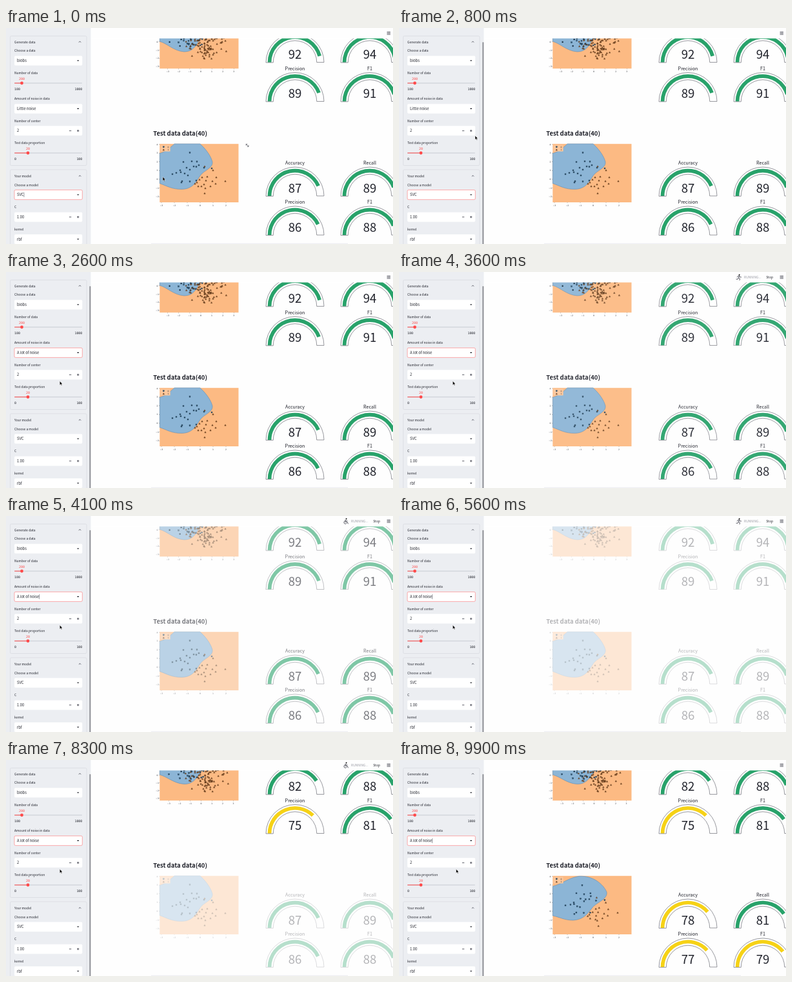
Write an HTML page that moves like this. It is 600x337 px and loops after 10 s.

```html
<!DOCTYPE html>
<html lang="en">
<head>
<meta charset="utf-8">
<title>Classifier playground</title>
<style>
html, body { margin: 0; width: 100%; height: 100%; overflow: hidden; background: #fefefe; }
svg { display: block; width: 600px; height: 337px; }
text { font-family: "Noto Sans CJK JP", "Noto Sans CJK SC", "Open Sans", sans-serif; fill: #20222b; }
.label { font-size: 4.98px; }
.field { font-size: 5.72px; }
.mono { font-family: "DejaVu Sans Mono", "Noto Sans Mono", monospace; font-size: 4.95px; }
.red { fill: #ff4b4b; }
.mid { text-anchor: middle; }
.end { text-anchor: end; }
.title { font-size: 9.5px; font-weight: 600; }
.name { font-size: 7.15px; text-anchor: middle; }
.num { font-size: 18.6px; text-anchor: middle; }
.tick { font-family: "DejaVu Sans", sans-serif; font-size: 3.1px; text-anchor: middle; }
.line { fill: none; stroke: #31333f; stroke-linecap: round; stroke-linejoin: round; }
</style>
</head>
<body>
<svg id="stage" viewBox="0 0 600 337" xmlns="http://www.w3.org/2000/svg"></svg>
<script>
const LOOP = 10000, STEP = 100;
const GREEN = '#28a26a', YELLOW = '#f6d216', ORANGE = '#fcba83', BLUE = '#8cb5d6', PAGE = '#fefefe';

const text = (x, y, s, cls) => `<text x="${x}" y="${y}" class="${cls}">${s}</text>`;
const rect = (x, y, w, h, fill, more = '') =>
  `<rect x="${x}" y="${y}" width="${w}" height="${h}" fill="${fill}" ${more}/>`;
const line = (d, w, more = '') => `<path d="${d}" class="line" stroke-width="${w}" ${more}/>`;
const group = (id, s) => `<g id="${id}">${s}</g>`;

function seeded(seed) {
  return () => {
    seed = (seed * 1664525 + 1013904223) % 4294967296;
    return seed / 4294967296;
  };
}

// Sidebar
const box = (y, h = 15) => rect(13, y, 105.3, h, '#fff', 'rx="1.8"');
const down = y => `<path d="M110 ${y - .8}h3.4l-1.7 1.8z" fill="#20222b"/>`;
const field = (y, s, id = '') =>
  box(y) + `<text ${id && `id="${id}"`} x="17" y="${y + 9.5}" class="field">${s}</text>`;
const select = (y, s, id) => field(y, s, id) + down(y + 7.5);
const stepper = (y, s) => field(y, s) +
  line(`M98.3 ${y + 7.5}h2.6M110.4 ${y + 7.5}h2.6M111.7 ${y + 6.2}v2.6`, .8);
const header = (y, s) => text(13, y, s, 'label') + line(`M113.2 ${y - 1.5}l1.3-1.3 1.3 1.3`, .8);

function slider(y, x, val, min, max) {
  return rect(13, y - .45, 105, .9, '#c8cbd3', 'rx=".4"') + rect(13, y - .45, x - 13, .9, '#ff4b4b', 'rx=".4"') +
    `<circle cx="${x}" cy="${y}" r="2.4" fill="#ff4b4b"/>` +
    text(x, y - 4.7, val, 'mono red mid') + text(13, y + 10.9, min, 'mono') +
    text(118.3, y + 10.9, max, 'mono end');
}

function sidebar() {
  const card = (y, h) => rect(6.5, y, 118.5, h, 'none', 'rx="1.8" stroke="#d3d6dc" stroke-width=".6"');
  const labels = [[37, 'Choose a data'], [72, 'Number of data'], [112, 'Amount of noise in data'],
    [147, 'Number of center'], [181.3, 'Test data proportion'], [246.8, 'Choose a model'],
    [281, 'C'], [315.8, 'kernel']];
  return rect(0, 0, 131.5, 337, '#eceef2') + card(12.5, 202) + card(221, 130) +
    header(23.6, 'Generate data') + header(232.8, 'Your model') +
    labels.map(([y, s]) => text(13, y, s, 'label')).join('') +
    select(43.5, 'blobs') + slider(86, 24.5, 200, 100, 1000) +
    select(118.4, 'Little noise', 'noise') + stepper(152.8, '2') + slider(195, 34, 20, 0, 100) +
    select(252.7, 'SVC', 'model') + stepper(287.4, '1.00') + select(322, 'rbf') +
    rect(13, 0, 105.3, 15, 'none', 'id="focus" rx="1.8" stroke="#ff5a5a" stroke-width=".5"') +
    rect(0, 0, .5, 7.4, '#31333f', 'id="caret"') +
    rect(129.4, 22, 1.9, 330, '#8b8d92', 'id="bar" rx="1"') +
    group('menu',
      rect(13, 136.4, 105.3, 40, '#fff', 'rx="1.8" stroke="#dcdee4" stroke-width=".5"') +
      rect(13, 157, 105.3, 17, '#f0f2f6') +
      text(17, 149.5, 'Little noise', 'field') + text(17, 167.5, 'A lot of noise', 'field'));
}

// Gauges
function gauge(cx, y, name, v) {
  const at = (r, a) => `${cx - r * Math.cos(a)} ${y - r * Math.sin(a)}`;
  const ring = (ro, ri, a) =>
    `M${at(ro, 0)}A${ro} ${ro} 0 0 1 ${at(ro, a)}L${at(ri, a)}A${ri} ${ri} 0 0 0 ${at(ri, 0)}z`;
  return text(cx, y - 49, name, 'name') +
    `<path d="${ring(42.3, 36.6, Math.PI * v / 100)}" fill="${v < 80 ? YELLOW : GREEN}"/>` +
    line(ring(45, 33.75, Math.PI), .5) + text(cx, y - 5.4, v, 'num');
}
const gauges = (y, v) => ['Accuracy', 'Recall', 'Precision', 'F1'].map((name, i) =>
  gauge(i % 2 ? 564 : 448, y + (i > 1 ? 61 : 0), name, v[i])).join('');

// Plots
const square = (x, y) => rect(x - .95, y - .95, 1.9, 1.9, '#2f5f84', 'stroke="#1c2f3d" stroke-width=".4"');
const triangle = (x, y) =>
  `<path d="M${x} ${y - 1.2}l1.2 2.2h-2.4z" fill="#a9622a" stroke="#2c1c10" stroke-width=".4"/>`;

function frame(y, h, region, xs, ys) {
  return rect(238.3, y, 122.2, h, ORANGE) +
    `<path d="${region}" fill="${BLUE}" stroke="#4f83b0" stroke-width=".5"/>` +
    xs.map(([x, s]) => rect(x - .15, y + h, .3, 1.2, '#333') + text(x, y + h + 5.8, s, 'tick')).join('') +
    ys.map(([v, s]) => rect(237, v - .15, 1.2, .3, '#333') + text(234.6, v + 1.1, s, 'tick')).join('');
}
const ticks = (from, to, zero, unit) => {
  const out = [];
  for (let n = from; n <= to; n++) out.push([zero + n * unit, n < 0 ? '−' + -n : n]);
  return out;
};

function trainPlot(region, x0, ux, y0, uy, shift, spread) {
  const rnd = seeded(11), bell = () => (rnd() + rnd() + rnd() + rnd() - 2) * 1.75;
  const cloud = (n, mx, sx, my, sy, mark) => {
    let s = '';
    for (let i = 0; i < n; i++) {
      const x = mx + shift + bell() * sx * spread, y = my + bell() * sy * spread;
      if (y > 14 && y < 58) s += mark(x, y);
    }
    return s;
  };
  return frame(10, 53.3, region, ticks(-3, 3, x0, ux), ticks(-3, 0, y0, -uy)) +
    cloud(36, 288, 11, 18, 7, square) + cloud(95, 309, 14, 25.5, 9.5, triangle);
}

const SQUARES = [285,194.5, 288,208, 296,208.5, 275,209, 291,216, 299,214, 295,216.5, 307,218, 319,219,
  280,218, 285,221, 270,222, 271,225, 264,226, 258,228, 277,227, 282,230, 273,239, 285,239.5, 272,241, 295,238];
const TRIANGLES = [321,222, 308,216, 312,232, 304,233, 326,233, 310,238, 320,239, 340,239, 300,236.5,
  293,243, 307,244, 298,247, 303,247, 317,247, 325,243, 309,250, 308,258, 296,241];

function testPlot(region, jitter) {
  const rnd = seeded(5), off = () => (rnd() - .5) * jitter;
  const marks = (list, mark) => {
    let s = '';
    for (let i = 0; i < list.length; i += 2) s += mark(list[i] + off(), list[i + 1] + off());
    return s;
  };
  return frame(180.8, 91.2, region, ticks(-3, 2, 301, 20), ticks(-2, 4, 236, -13.65)) +
    marks(SQUARES, square) + marks(TRIANGLES, triangle) +
    rect(239.6, 182.5, 15, 10, ORANGE, 'rx=".5"') +
    rect(239.6, 182.5, 15, 10, '#fff', 'fill-opacity=".2" rx=".5"') +
    square(244.3, 185.6) + triangle(244.3, 190) +
    text(251.5, 186.6, 0, 'tick') + text(251.5, 191, 1, 'tick');
}

const TRAIN_A = 'M238.3 10V21C250 24 260 36 276 37C291 37 295 27 304 10z';
const TRAIN_B = 'M238.3 10V23C250 26 260 36.5 276 37.5C291 38 297 27 307 10z';
const TEST_A = 'M238.3 195.5C248 193 254 187 261 180.8H301C312 191 318 201 320 209C321 217 311 221 304 227' +
  'C296 235 293 251 273 251.5C257 252 249 246 238.3 242.5z';
const TEST_B = 'M238.3 197C252 194 262 184 279 181.3C301 180 317 194 322 206C324 217 307 222 300 230' +
  'C293 239 287 249 270 250C256 250 249 245 238.3 243z';

// Status icon poses, drawn around 0,0
const POSES = [
  'M-4 2.5a1.8 1.8 0 1 0 3.6 0a1.8 1.8 0 1 0-3.6 0M1 2.5a1.8 1.8 0 1 0 3.6 0a1.8 1.8 0 1 0-3.6 0M-2 2.5L0-1L2-.5M0-1L.6 2',
  'M-1-1.8V1.2H2L3.4 4M-1-.3H2M-2.3.3a2.3 2.3 0 1 0 3.6 2.7',
  'M-4 3q1.3-1 2.6 0t2.6 0 2.6 0M-3 1L0-1L2.4 1.3M0-1L3-1.2',
  'M.6-1.8L-.6 1.2L1.5 2.3L1 4.8M-.6 1.2L-1.8 3.2H-4M-2.6 0L-1.6-1.6L.6-1.8L2 0H3.6'
];

const stage = document.getElementById('stage');
stage.innerHTML =
  rect(0, 0, 600, 337, PAGE) +
  group('topOld', trainPlot(TRAIN_A, 302, 17.1, 21.6, 12.8, 0, 1) + gauges(53.5, [92, 94, 89, 91])) +
  group('topNew', trainPlot(TRAIN_B, 302.5, 16.7, 24, 11.8, 1, 1.06) + gauges(53.5, [82, 88, 75, 81])) +
  group('heading', text(228.3, 168.2, 'Test data data(40)', 'title')) +
  group('lowOld', testPlot(TEST_A, 0) + gauges(262, [87, 89, 86, 88])) +
  group('lowNew', testPlot(TEST_B, 4) + gauges(262, [78, 81, 77, 79])) +
  group('expand', line('M372.2 181.2l3.8 3.8M372.2 183v-1.8h1.8M376 183.2v1.8h-1.8', .6)) +
  rect(131.5, 0, 468.5, 16.3, PAGE) + rect(225, 335.8, 305, 1.2, '#eeeff2') +
  line('M591 6.2h4.6M591 8.1h4.6M591 10h4.6', .8) +
  group('status', '<g transform="translate(527 8)"><circle cx=".6" cy="-3.6" r="1"/>' +
    line('', .8, 'id="pose"') + '</g>' +
    '<text x="535" y="9.9" class="label" style="fill:#9a9ca5">RUNNING...</text>' +
    text(569.3, 10, 'Stop', 'label')) +
  sidebar() +
  group('arrow', '<path d="M0 0V6.2L1.5 4.9L2.5 7.1L3.5 6.6L2.5 4.5H4.4z" fill="#000" stroke="#fff" stroke-width=".5"/>') +
  group('beam', line('M-1.3-3q1.3 0 1.3.8V2.2q0 .8-1.3.8M1.3-3q-1.3 0-1.3.8M1.3 3q-1.3 0-1.3-.8', .65));

const $ = id => document.getElementById(id);
const show = (id, on) => $(id).style.display = on ? '' : 'none';
const between = (t, a, b) => t >= a && t < b;

// time, x, y
const PATH = [[0, 243, 232.3], [100, 243, 232.3], [600, 118, 168], [800, 118, 168], [1600, 111, 128.7],
  [1900, 111, 128.7], [2400, 83.3, 170.2], [9600, 83.3, 170.2], [9800, 88.5, 170.2], [LOOP, 88.5, 170.2]];

function pointer(t) {
  const i = PATH.findIndex(p => p[0] > t);
  const [a, b] = [PATH[i - 1], PATH[i]];
  const p = (t - a[0]) / (b[0] - a[0]), k = p * p * (3 - 2 * p);
  return [a[1] + (b[1] - a[1]) * k, a[2] + (b[2] - a[2]) * k];
}

function draw(t) {
  const [x, y] = pointer(t);
  const onField = between(t, 1300, 2000);
  for (const id of ['arrow', 'beam']) $(id).setAttribute('transform', `translate(${x} ${y})`);
  show('arrow', !onField);
  show('beam', onField);
  show('expand', t < 200);

  const open = between(t, 1900, 2600);
  show('menu', open);
  show('bar', t >= 400 && !open);
  $('noise').textContent = t < 2600 ? 'Little noise' : 'A lot of noise';

  const onModel = t < 1600, focused = onModel || t >= 1900;
  const owner = $(onModel ? 'model' : 'noise'), top = onModel ? 252.7 : 118.4;
  const blink = Math.floor((t - (onModel ? 0 : 1965) + 1060) / 530) % 2 === 0;
  show('focus', focused);
  $('focus').setAttribute('y', top);
  show('caret', focused && blink);
  $('caret').setAttribute('x', 17.4 + owner.getComputedTextLength());
  $('caret').setAttribute('y', top + 3.8);

  // Stale results fade, then each section is replaced at once
  const p = Math.min(1, Math.max(0, (t - 3350) / 1000));
  const stale = 1 - .67 * Math.pow(p, 1.7);
  const topDone = t >= 6500, lowDone = t >= 9500;
  show('topOld', !topDone);
  show('topNew', topDone);
  show('lowOld', !lowDone);
  show('lowNew', lowDone);
  $('topOld').style.opacity = $('lowOld').style.opacity = stale;
  $('heading').style.opacity = topDone ? 1 : stale;

  const running = between(t, 2850, 9500);
  show('status', running);
  if (running) $('pose').setAttribute('d', POSES[Math.floor((t - 2850) / 250) % POSES.length]);
}

const start = performance.now();
function tick() {
  const t = (performance.now() - start) % LOOP;
  draw(Math.floor(t / STEP) * STEP);
  requestAnimationFrame(tick);
}
tick();
</script>
</body>
</html>
```
